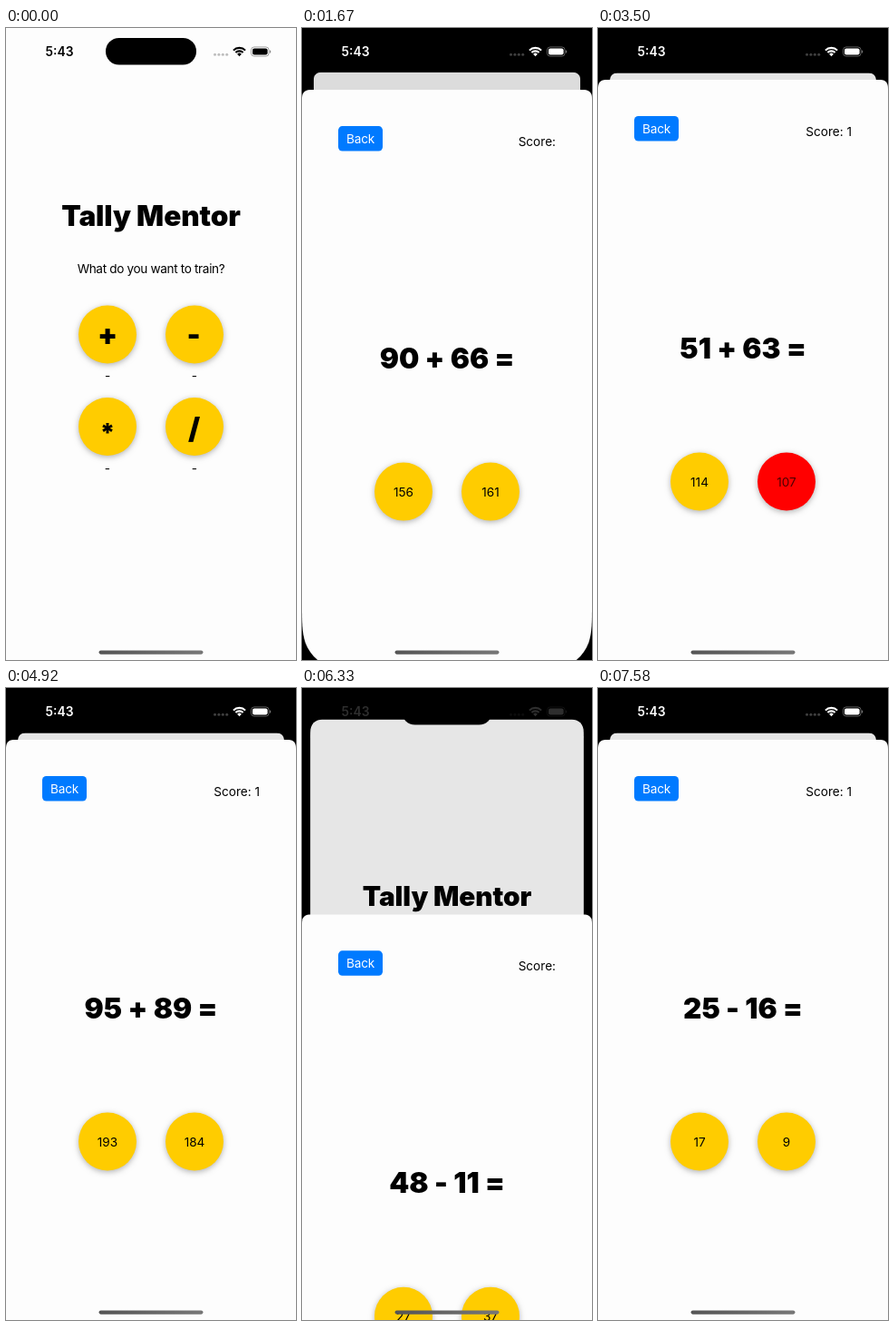
Animation of 320 by 696 pixels, one loop 8000 ms. Source, as an HTML page with a canvas:

```html
<!DOCTYPE html>
<html lang="en">
<head>
<meta charset="utf-8">
<title>Arithmetic practice</title>
<style>
html, body { margin: 0; width: 100%; height: 100%; overflow: hidden; background: #000; }
canvas { display: block; width: 320px; height: 696px; }
</style>
</head>
<body>
<canvas id="stage"></canvas>
<script>
const W = 320, H = 696, LOOP = 8000, FPS = 12;
const SHEET_TOP = 57, SHEET_HEIGHT = H - SHEET_TOP;
const PAPER = '#fdfdfd', YELLOW = '#ffcc00', GREEN = '#00ff00', RED = '#ff0000', BLUE = '#007aff';
const COLUMNS = [112, 208];

const canvas = document.getElementById('stage');
const ctx = canvas.getContext('2d');
const ratio = window.devicePixelRatio || 1;
canvas.width = W * ratio;
canvas.height = H * ratio;

// Sheet movements: start time and whether the sheet opens
const moves = [
  { at: 1338, opens: true },
  { at: 5425, opens: false },
  { at: 6200, opens: true }
];
const SETTLE = 540;

const rounds = [
  { at: 0, sum: '90 + 66 =', answers: [156, 161], score: '' },
  { at: 2495, sum: '90 + 66 =', answers: [156, 161], marks: [GREEN], score: ' 1' },
  { at: 3080, sum: '51 + 63 =', answers: [114, 107], score: ' 1' },
  { at: 3495, sum: '51 + 63 =', answers: [114, 107], marks: [null, RED], score: ' 1' },
  { at: 4330, sum: '51 + 63 =', answers: [114, 107], marks: [GREEN, RED], score: ' 1' },
  { at: 4910, sum: '95 + 89 =', answers: [193, 184], score: ' 1' },
  { at: 6160, sum: '48 - 11 =', answers: [27, 37], score: '' },
  { at: 6995, sum: '48 - 11 =', answers: [27, 37], marks: [null, GREEN], score: ' 1' },
  { at: 7580, sum: '25 - 16 =', answers: [17, 9], score: ' 1' }
];

const lerp = (a, b, k) => a + (b - a) * k;
const clamp = k => Math.max(0, Math.min(1, k));
const latest = (list, t) => list.filter(item => item.at <= t).pop();
const during = (t, from, to) => t >= from && t < to;

function text(str, x, y, { size = 13.6, weight = 400, align = 'center', color = '#000', spacing = 0 } = {}) {
  ctx.font = `${weight} ${size}px Inter, sans-serif`;
  ctx.letterSpacing = spacing + 'px';
  ctx.textAlign = align;
  ctx.fillStyle = color;
  ctx.fillText(str, x, y);
}

// Draws a sign with its ink centred on a point
function sign(str, x, y, size, color) {
  ctx.font = `900 ${size}px Inter, sans-serif`;
  ctx.letterSpacing = '0px';
  ctx.textAlign = 'left';
  const m = ctx.measureText(str);
  ctx.fillStyle = color;
  ctx.fillText(str,
    x - (m.actualBoundingBoxRight - m.actualBoundingBoxLeft) / 2,
    y + (m.actualBoundingBoxAscent - m.actualBoundingBoxDescent) / 2);
}

function pill(x, y, w, h, r, color) {
  ctx.beginPath();
  ctx.roundRect(x, y, w, h, r);
  ctx.fillStyle = color;
  ctx.fill();
}

function disc(x, y, color) {
  ctx.save();
  ctx.shadowColor = 'rgba(0,0,0,.3)';
  ctx.shadowBlur = 6 * ratio;
  ctx.shadowOffsetY = 1.6 * ratio;
  ctx.beginPath();
  ctx.arc(x, y, 32, 0, Math.PI * 2);
  ctx.fillStyle = color;
  ctx.fill();
  ctx.restore();
}

// Rectangle with smooth, continuous-curvature corners
function smoothRect(x, y, w, h, top, bottom) {
  const corner = (cx, cy, ux, uy, vx, vy, r) => {
    const at = (a, b) => [cx + r * (a * ux + b * vx), cy + r * (a * uy + b * vy)];
    ctx.lineTo(...at(1.529, 0));
    ctx.bezierCurveTo(...at(1.088, 0), ...at(0.868, 0), ...at(0.631, 0.075));
    ctx.bezierCurveTo(...at(0.373, 0.169), ...at(0.169, 0.373), ...at(0.075, 0.631));
    ctx.bezierCurveTo(...at(0, 0.868), ...at(0, 1.088), ...at(0, 1.529));
  };
  ctx.beginPath();
  corner(x, y, 0, 1, 1, 0, top);
  corner(x + w, y, -1, 0, 0, 1, top);
  corner(x + w, y + h, 0, -1, -1, 0, bottom);
  corner(x, y + h, 1, 0, 0, -1, bottom);
  ctx.closePath();
}

function sheetState(t) {
  const move = latest(moves, t);
  if (!move) return { open: 0, settled: true, tint: 0 };
  const dt = t - move.at;
  const k = dt * 0.01826;
  const rest = dt > SETTLE ? 0 : (1 + k) * Math.exp(-k);
  const f = clamp((dt - 60) / 270);
  const fade = f * f * (3 - 2 * f);
  return {
    open: move.opens ? 1 - rest : rest,
    settled: dt > SETTLE,
    tint: move.opens ? fade : 1 - fade
  };
}

function drawMenu(t, { open, settled }) {
  const scale = lerp(1, 294 / 320, open);
  const radius = settled && !open ? 0 : lerp(48, 9, clamp(open * 1.25));
  ctx.save();
  ctx.translate(13 * open, 49.5 * open);
  ctx.scale(scale, scale);
  smoothRect(0, 0, W, H, radius, radius);
  ctx.clip();
  ctx.fillStyle = PAPER;
  ctx.fillRect(0, 0, W, H);

  text('Tally Mentor', 160, 218, { size: 31.5, weight: 900, spacing: -0.1 });
  text('What do you want to train?', 160, 270.4, { spacing: -0.35 });

  const faded = 'rgba(0,0,0,.35)';
  const plus = during(t, 1330, 1410) ? faded : '#000';
  const minus = during(t, 6160, 6240) ? faded : '#000';
  const [left, right] = COLUMNS;
  for (const x of COLUMNS) {
    disc(x, 337.5, YELLOW);
    disc(x, 439, YELLOW);
    text('-', x, 489.8);
  }
  sign('+', left, 339, 32, plus);
  sign('-', right - 0.5, 339.5, 32, minus);
  sign('*', left, 441, 28, '#000');
  sign('/', right - 0.5, 441.5, 32, '#000');
  text(t > 2500 ? 'Score: 1' : '-', left, 388.2, { spacing: -0.15 });
  text('-', right, 388.2);

  ctx.fillStyle = `rgba(0,0,0,${(settled ? 0.095 : 0.13) * open})`;
  ctx.fillRect(0, 0, W, H);
  ctx.restore();
}

function drawSheet(t, { open, settled }) {
  const round = latest(rounds, t);
  ctx.save();
  ctx.translate(0, SHEET_HEIGHT * (1 - open));
  smoothRect(0, SHEET_TOP, W, SHEET_HEIGHT, 8, settled ? 0 : 48);
  ctx.clip();
  ctx.fillStyle = PAPER;
  ctx.fillRect(0, SHEET_TOP, W, SHEET_HEIGHT);

  pill(40, 97, 49, 27.5, 4.5, BLUE);
  const backColor = during(t, 5410, 5490) ? 'rgba(255,255,255,.4)' : '#fff';
  text('Back', 64.5, 116, { color: backColor, spacing: -0.15 });
  text('Score:' + round.score, 280, 119, { align: 'right' });
  text(round.sum, 160, 364, { size: 31.5, weight: 900 });
  COLUMNS.forEach((x, i) => {
    const mark = round.marks && round.marks[i];
    disc(x, 499.5, mark || YELLOW);
    text(round.answers[i], x, 504.5, { color: mark ? 'rgba(0,0,0,.7)' : '#000' });
  });
  ctx.restore();
}

function drawStatus(tint) {
  const level = Math.round(255 * tint);
  const ink = alpha => `rgba(${level},${level},${level},${alpha})`;
  pill(110, 11, 100, 29.5, 14.75, '#000');
  text('5:43', 59, 31, { size: 13.8, weight: 600, color: ink(1) });

  for (let i = 0; i < 4; i++) pill(229 + i * 4.4, 27.8, 3, 3, 1.5, ink(0.25));

  ctx.strokeStyle = ink(1);
  ctx.lineWidth = 2.1;
  for (const r of [9.3, 5.8]) {
    ctx.beginPath();
    ctx.arc(257.5, 31.2, r, -Math.PI * 0.75, -Math.PI * 0.25);
    ctx.stroke();
  }
  ctx.beginPath();
  ctx.moveTo(257.5, 31.2);
  ctx.arc(257.5, 31.2, 3.4, -Math.PI * 0.75, -Math.PI * 0.25);
  ctx.fillStyle = ink(1);
  ctx.fill();

  ctx.beginPath();
  ctx.roundRect(270.5, 20.9, 19.6, 10.2, 3.4);
  ctx.strokeStyle = ink(0.4);
  ctx.lineWidth = 0.9;
  ctx.stroke();
  pill(272, 22.4, 16.6, 7.2, 2.1, ink(1));
  pill(291, 24.4, 1.2, 3.2, 0.6, ink(0.45));
}

function drawHomeBar() {
  const shade = ctx.createLinearGradient(103, 0, 217, 0);
  shade.addColorStop(0, '#555');
  shade.addColorStop(1, '#777');
  pill(102.5, 685.5, 115, 4.2, 2.1, shade);
}

function draw(now) {
  const frame = Math.floor((now % LOOP) * FPS / 1000 + 0.06) % (LOOP * FPS / 1000);
  const t = frame * 1000 / FPS;
  const state = sheetState(t);

  ctx.setTransform(ratio, 0, 0, ratio, 0, 0);
  ctx.fillStyle = '#000';
  ctx.fillRect(0, 0, W, H);
  drawMenu(t, state);
  if (state.open > 0) drawSheet(t, state);
  drawStatus(state.tint);
  drawHomeBar();
}

const start = performance.now();
function tick() {
  draw(performance.now() - start);
  requestAnimationFrame(tick);
}
tick();
</script>
</body>
</html>
```
